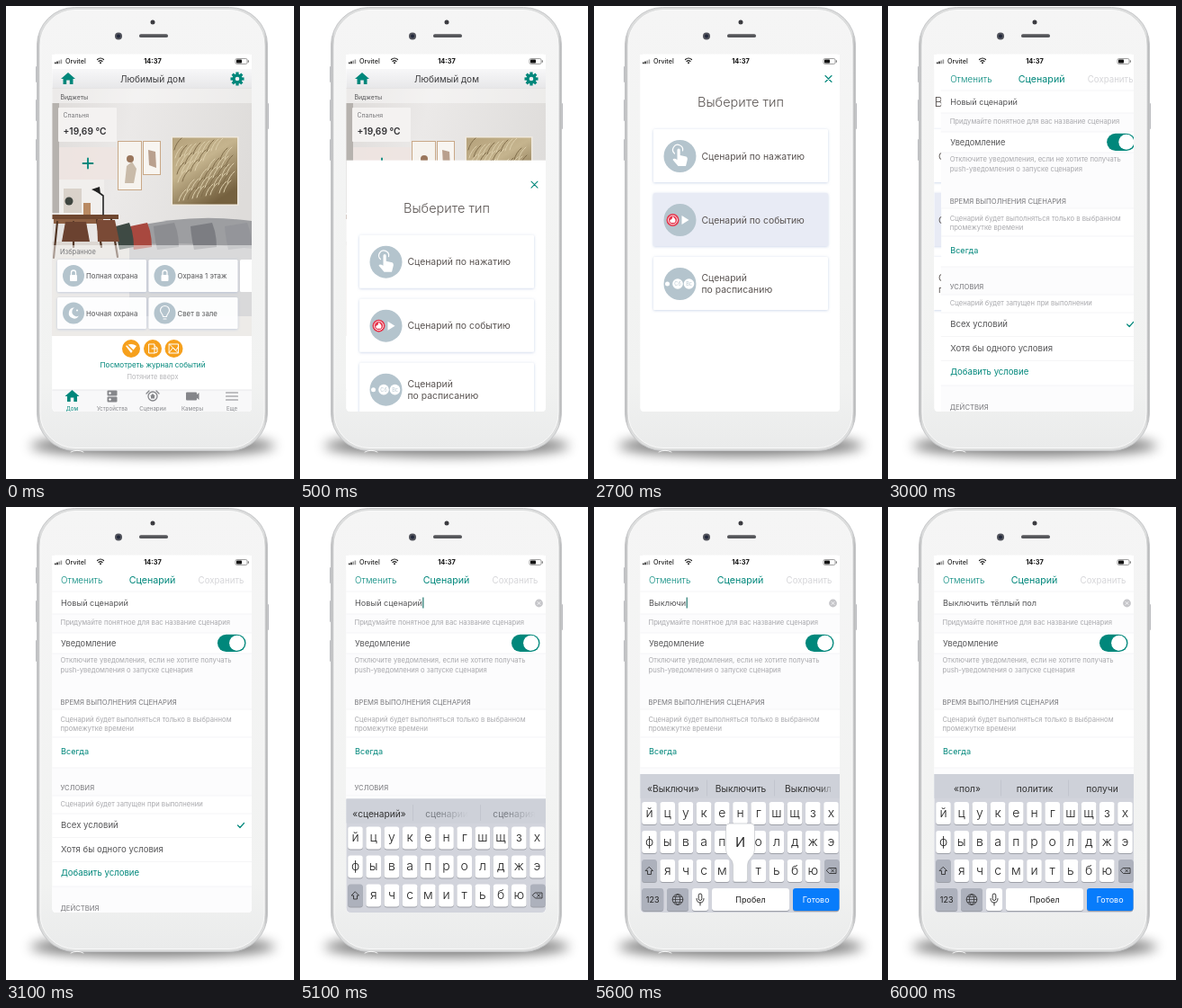
An HTML page that plays this animation: 320 px wide and 526 px high, repeating every 8000 ms.

```html
<!DOCTYPE html>
<html lang="ru">
<head>
<meta charset="utf-8">
<style>
html, body { margin: 0; width: 100%; height: 100%; overflow: hidden; background: #fff; }
svg { display: block; width: 100%; height: 100%; font-family: Inter, Roboto, sans-serif; }
</style>
</head>
<body>
<svg viewBox="0 0 320 526">
  <defs>
    <clipPath id="screen"><path d="M51.500 54H273V446q0 5-5 5H56.500q-5 0-5-5Z"/></clipPath>
    <clipPath id="photo"><rect x="51" y="91" width="222" height="276"/></clipPath>
    <filter id="blur" x="-20%" y="-150%" width="140%" height="400%"><feGaussianBlur stdDeviation="6.5"/></filter>
    <filter id="soft"><feGaussianBlur stdDeviation=".7"/></filter>
    <filter id="lift" x="-10%" y="-20%" width="120%" height="140%">
      <feDropShadow dx="0" dy="0.6" stdDeviation="1.6" flood-color="#8fa5cf" flood-opacity=".5"/>
    </filter>
    <linearGradient id="rim">
      <stop offset="0" stop-color="#b4b5b7"/><stop offset=".015" stop-color="#dcdddd"/>
      <stop offset=".985" stop-color="#dcdddd"/><stop offset="1" stop-color="#b0b1b3"/>
    </linearGradient>
    <linearGradient id="face" x2="0" y2="1">
      <stop offset="0" stop-color="#f5f5f5"/><stop offset=".85" stop-color="#f1f2f1"/><stop offset="1" stop-color="#eaebeb"/>
    </linearGradient>
    <linearGradient id="wall" x2="1" y2=".3">
      <stop offset="0" stop-color="#dedbd9"/><stop offset=".4" stop-color="#ebe9e8"/><stop offset="1" stop-color="#dedcda"/>
    </linearGradient>
    <linearGradient id="grass" x2=".6" y2="1">
      <stop offset="0" stop-color="#b5a27c"/><stop offset=".45" stop-color="#c5b48e"/><stop offset="1" stop-color="#75613f"/>
    </linearGradient>
    <linearGradient id="bar" x2="0" y2="1"><stop offset="0" stop-color="#f8f8f9"/><stop offset="1" stop-color="#e7e7e9"/></linearGradient>
    <linearGradient id="fade"><stop offset=".3" stop-color="#777b82"/><stop offset="1" stop-color="#777b82" stop-opacity="0"/></linearGradient>
    <linearGradient id="fadeEnd"><stop offset=".75" stop-color="#333"/><stop offset="1" stop-color="#333" stop-opacity=".15"/></linearGradient>
  </defs>
  <g id="body"></g>
  <g id="content" clip-path="url(#screen)"></g>
  <g id="status"></g>
</svg>
<script>
const TEAL = '#00877b', INK = '#555557', PALE = '#a9a9ad', DISC = '#b4c4cd';
const LIGHT = 'font-weight="300"';
const $ = id => document.getElementById(id);

const rect = (x, y, w, h, fill, r = 0, more = '') =>
  `<rect x="${x}" y="${y}" width="${w}" height="${h}" rx="${r}" fill="${fill}" ${more}/>`;
const disc = (x, y, r, fill, more = '') => `<circle cx="${x}" cy="${y}" r="${r}" fill="${fill}" ${more}/>`;
const fillPath = (d, fill) => `<path d="${d}" fill="${fill}"/>`;
const stroke = (d, color, width = 1) =>
  `<path d="${d}" fill="none" stroke="${color}" stroke-width="${width}" stroke-linecap="round" stroke-linejoin="round"/>`;
const text = (x, y, size, str, fill = INK, more = '') =>
  `<text x="${x}" y="${y}" font-size="${size}" fill="${fill}" ${more}>${str}</text>`;
const centred = (x, y, size, str, fill = INK, more = '') => text(x, y, size, str, fill, 'text-anchor="middle" ' + more);
const at = (x, y, inner) => `<g transform="translate(${x} ${y})">${inner}</g>`;

const house = color => fillPath('M0-7 8 0H5.5V6H1.8V1.5H-1.8V6H-5.5V0H-8Z', color);

function phone() {
  const side = (x, y, h) => rect(x, y, 2, h, '#bcbdc0', 1);
  return `<ellipse cx="163" cy="489" rx="136" ry="12" fill="#000" opacity=".5" filter="url(#blur)"/>` +
    side(33, 67, 18) + side(33, 104, 24) + side(33, 148, 24) + side(290, 108, 29) +
    rect(34.5, 1.5, 256, 493, 'url(#rim)', 42, 'stroke="#c6c7c9"') +
    rect(38, 4.5, 249, 487, 'url(#face)', 39, 'stroke="#f9f9f9"') +
    disc(163, 18, 2.5, '#3b3b40') + disc(125, 33.5, 4, '#50525a') + disc(125, 33.5, 2, '#22283c') +
    rect(148, 31.3, 32, 3.8, '#55565a', 1.9) +
    stroke('M72 496Q79 492.500 86 496', '#fff', .8) + rect(51.5, 53.5, 221.5, 397.5, '#fff', 4);
}

function statusBar() {
  const bars = [0, 1, 2, 3].map(i => rect(54 + i * 2.2, 62.5 - i, 1.6, 1.8 + i, i < 2 ? '#222' : '#999', .3)).join('');
  return rect(51.5, 54, 221.5, 16, '#fff') + bars + text(66, 64, 7.2, 'Orvitel', '#222', 'font-weight="500"') +
    stroke('M101.500 59.500Q105 56.500 108.500 59.500M103 61.500Q105 59.700 107 61.500', '#222', 1.2) + disc(105, 63.3, 1, '#222') +
    centred(163, 64, 7.4, '14:37', '#111', 'font-weight="700"') +
    rect(255, 58.5, 13, 6, 'none', 1.5, 'stroke="#777" stroke-width=".7"') + rect(256, 59.5, 6, 4, '#111', .7) +
    rect(268.7, 60.2, 1.2, 2.6, '#777', .5);
}

function room() {
  const blades = Array.from({ length: 60 }, (_, i) => {
    const x = 187 + i * 37 % 60, y = 153 + i * 23 % 58;
    return stroke(`M${x} ${y + 7}q2-8 8-13`, i % 3 ? '#ddcfac' : '#806d4b', 1);
  }).join('');
  const cushion = (x, w, color) => fillPath(`M${x} 245l${w - 3}-4q5 12 5 27l-${w - 2} 3q-3-13-${4}-26z`, color);
  return `<g clip-path="url(#photo)">` + rect(51, 91, 222, 276, 'url(#wall)') + '<g filter="url(#soft)">' +
    rect(51, 108, 8, 122, '#b6b2ae') + rect(59, 193, 50, 42, '#f1efed') +
    rect(64, 203, 20, 27, '#d9d2ca') + disc(70, 217, 4.5, '#3f4640') + rect(86, 219, 8, 14, '#b98a63') +
    rect(124.5, 150.5, 26, 54, '#f6f3ee', 0, 'stroke="#c9a887"') +
    fillPath('M132 197l2-19 6-5 5 8-3 16z', '#c9bba9') + disc(138, 170, 4, '#9a765c') +
    rect(152.5, 150.5, 19, 37, '#f8f5f1', 0, 'stroke="#c9a887"') + fillPath('M158 160l8 2 1 18-8-3z', '#b9a08e') +
    rect(183.5, 145, 75, 77, '#efe9df') + rect(185, 146.5, 72, 74, 'url(#grass)') + blades +
    rect(51, 262, 222, 105, '#dcd7d2') +
    fillPath('M142 246Q205 230 273 239V310H142Z', '#9d9ea1') + fillPath('M137 267Q185 260 273 270V345H137Z', '#b3b3b5') +
    cushion(164, 26, '#8c8d91') + cushion(205, 27, '#7c7d82') + cushion(243, 28, '#94959a') +
    cushion(138, 22, '#a8483f') + cushion(122, 18, '#3e4a44') +
    rect(51, 232, 74, 5, '#6f4730') + rect(53, 237, 55, 5, '#8d6043') +
    stroke('M57 240l-4 40M117 237l7 42M75 240v28M101 238l5 30', '#523625', 2.2) +
    fillPath('M66 240h23l4 22H62z', '#6b4230') + fillPath('M101 238h20l5 24h-24z', '#7a4a36') +
    stroke('M108 232V211l-8-6', '#222', 1.6) + fillPath('M95 204l9-3 1 8z', '#222') +
    '</g>' + rect(51, 266, 222, 101, '#fff', 0, 'opacity=".5"') + '</g>';
}

function home() {
  const lock = rect(-4, -1, 8, 7, '#fff', 1) + stroke('M-2.500-1V-3.500a2.500 2.500 0 0 1 5 0V-1', '#fff', 1.3);
  const moon = fillPath('M1-6A6 6 0 1 0 6 3 5 5 0 0 1 1-6Z', '#fff') + disc(4, -3, 1, '#fff');
  const bulb = stroke('M-2 4C-2 1-5 0-5-3a5 5 0 0 1 10 0C5 0 2 1 2 4ZM-1.500 6.500h3', '#fff', 1.1);
  const tile = (x, y, h, label, icon) => rect(x, y, 99, h, '#fff', 1.5, 'fill-opacity=".96" filter="url(#lift)"') +
    disc(x + 18, y + h / 2, 12, DISC) + at(x + 18, y + h / 2, icon) + text(x + 32, y + h / 2 + 3, 7.8, label);
  const alert = (x, icon) => disc(x, 381, 10, '#f6a01c') + at(x, 381, icon);
  const gray = '#85868a';
  const tab = (x, label, icon, color = gray) => at(x, 434, icon) + centred(x, 449.5, 6.1, label, color);
  const gear = Array.from({ length: 8 }, (_, i) => `<rect x="-1.600" y="-7.500" width="3.200" height="4" fill="${TEAL}" transform="rotate(${i * 45})"/>`).join('') +
    disc(0, 0, 3.9, 'none', `stroke="${TEAL}" stroke-width="3.200"`);

  return rect(51, 54, 222, 397, '#fff') + room() + rect(51, 69, 222, 22.5, 'url(#bar)') +
    at(69, 81, house(TEAL)) + centred(163, 84.5, 10.1, 'Любимый дом', '#3e3e40') + at(257, 81, gear) +
    rect(51, 92, 222, 16, '#fff', 0, 'opacity=".4"') + text(60.5, 103.5, 6.9, 'Виджеты') +
    rect(58, 113, 65, 38, '#f6f4f3', 1, 'opacity=".93"') + text(63.5, 124, 6.9, 'Спальня', '#77777a') +
    text(63.5, 143, 10.2, '+19,69 °C', '#303033', 'font-weight="600"') +
    rect(59, 157, 64, 36, '#f0e5e2', 1, 'opacity=".88"') + stroke('M85.500 175h11M91 169.500v11', TEAL, 1.8) +
    text(60, 276, 7.4, 'Избранное', '#77777a') +
    tile(57, 282, 36, 'Полная охрана', lock) + tile(158.5, 282, 36, 'Охрана 1 этаж', lock) +
    tile(57, 324, 35, 'Ночная охрана', moon) + tile(158.5, 324, 35, 'Свет в зале', bulb) +
    rect(260, 282, 20, 36, '#fff', 1.5) + rect(51, 367, 222, 60, '#fff') +
    alert(139, fillPath('M-6-3Q0-7 6-3L0 5Z', '#fff') + stroke('M-5-5 5 5', '#f6a01c', 1.5)) +
    alert(163, stroke('M-4-5H2V5H-4ZM2-3l3 2v5L2 5M-1 0h6', '#fff')) +
    alert(186.5, stroke('M-5-5H5V5H-5ZM-5 4l4-5 3 3 3-4M-5-5 5 5', '#fff')) +
    centred(163, 402, 8.1, 'Посмотреть журнал событий', TEAL) + centred(163, 415, 7.4, 'Потяните вверх', '#b5b5b8') +
    rect(51, 427, 222, 24, '#f8f8f9') + stroke('M51 427H273', '#d2d2d4', .5) +
    tab(73.5, 'Дом', house(TEAL), TEAL) +
    tab(118, 'Устройства', rect(-5.5, -6.5, 11, 6, gray, 1) + rect(-5.5, .5, 11, 6, gray, 1) + disc(-2.5, -3.5, 1.2, '#fff') + disc(-2.5, 3.5, 1.2, '#fff')) +
    tab(163, 'Сценарии', disc(0, 0, 5, 'none', `stroke="${gray}" stroke-width="1.300"`) + stroke('M-7-3l3-3M7-3l-3-3', gray, 1.3) + fillPath('M0-3 3 0H2V2.500H-2V0H-3Z', gray)) +
    tab(207, 'Камеры', rect(-7, -4.5, 12, 9, gray, 1) + fillPath('M4-1 7.500-4V4L4 1Z', gray)) +
    tab(251, 'Еще', stroke('M-6.500-4h13M-6.500 0h13M-6.500 4h13', gray, 1.2));
}

function chooser(pressed) {
  const hand = stroke('M-6-3a5.500 5.500 0 1 1 9-3', '#fff', 1.2) +
    fillPath('M-3-7a1.600 1.600 0 0 1 3.200 0V-1L7 0.500Q9 1.500 8 5L6.500 11H-2L-8 4Q-7 1.500-3 4Z', '#fff');
  const event = disc(-8, 0, 7, '#e5354c') + disc(-8, 0, 5, 'none', 'stroke="#fff" stroke-width=".9"') +
    fillPath('M-8-4Q-3 0-6 3H-10Q-13 0-9-1Z', '#fff') + fillPath('M2-5 10 0 2 5Z', '#fff');
  const days = disc(-14, 0, 2.5, '#fff') + disc(-2.5, 0, 5.8, '#fff') + disc(10, 0, 5.8, '#fff') +
    centred(-2.5, 2, 5.5, 'Сб', DISC) + centred(10, 2, 5.5, 'Вс', DISC);
  const card = (y, icon, lines, active) => rect(66, y, 194, 59, active ? '#e8ebf5' : '#fff', 1.5, 'filter="url(#lift)"') +
    disc(95.5, y + 30, 18, DISC) + at(95.5, y + 30, icon) +
    lines.map((line, i) => text(119.5, y + 33.5 + (i - (lines.length - 1) / 2) * 13, 10.4, line, '#5b5553')).join('');
  return rect(51, 54, 222, 397, '#fff') + stroke('M257 77.500l7 7M264 77.500l-7 7', TEAL, 1.1) +
    centred(163, 112, 14.5, 'Выберите тип', '#5b5553', LIGHT) +
    card(137, hand, ['Сценарий по нажатию']) + card(208, event, ['Сценарий по событию'], pressed) +
    card(279, days, ['Сценарий', 'по расписанию']);
}

function form(name, editing, cursor) {
  const rule = y => stroke(`M51 ${y}H273`, '#eaeaed', .5);
  const note = (y, str) => text(60.5, y, 7.65, str, PALE);
  const row = (y, str, color, size = 9.6) => text(61, y, size, str, color);
  const head = (y, str) => text(60.5, y, 7.7, str, '#77777b');
  const bands = [[119, 21], [163, 62], [290, 31], [422, 29]].map(([y, h]) => rect(51, y, 222, h, '#fcfcfd')).join('');
  return rect(51, 54, 222, 397, '#fff') + bands + [94, 119, 140, 163, 225, 256, 290, 321, 341, 367.5, 394.5, 422].map(rule).join('') +
    text(61, 84.5, 9.8, 'Отменить', TEAL, LIGHT) + centred(162.5, 84.5, 10.7, 'Сценарий', TEAL) +
    text(264.5, 84.5, 9.7, 'Сохранить', '#d6d6d9', 'text-anchor="end"') +
    text(61, 110, 9.15, name, INK, 'id="name"') +
    (cursor ? rect(61, 100.5, 1.1, 12, '#0d6b62', 0, 'id="cursor"') : '') +
    (editing ? disc(265.5, 107, 4.4, '#c5c5c9') + stroke('M264 105.500l3 3M267 105.500l-3 3', '#fff', .8) : '') +
    note(130.5, 'Придумайте понятное для вас название сценария') + row(155, 'Уведомление', INK, 9.25) +
    rect(235, 141.7, 31.5, 19.3, TEAL, 9.65) + disc(256.6, 151.35, 8.5, '#fff') +
    note(173, 'Отключите уведомления, если не хотите получать') + note(183.5, 'push-уведомления о запуске сценария') +
    head(219.5, 'ВРЕМЯ ВЫПОЛНЕНИЯ СЦЕНАРИЯ') +
    note(239, 'Сценарий будет выполняться только в выбранном') + note(249, 'промежутке времени') + row(274.5, 'Всегда', TEAL, 9.15) +
    head(314.5, 'УСЛОВИЯ') + note(333, 'Сценарий будет запущен при выполнении') +
    row(357.3, 'Всех условий') + stroke('M257.500 354l2.500 2.500 4.500-5', TEAL, 1.2) +
    row(383.8, 'Хотя бы одного условия') + row(410.3, 'Добавить условие', TEAL) + head(448.5, 'ДЕЙСТВИЯ');
}

const KEY_ROWS = ['йцукенгшщзх', 'фывапролджэ', ' ячсмитьбю'];
const keyX = col => 61.5 + col * 20.2, keyY = line => 328 + line * 32;

function keyboard(offset, words, held, faded) {
  const cap = (x, y, w, fill = '#fff') => rect(x, y + 1, w, 25, '#9da0a8', 3) + rect(x, y, w, 25, fill, 3);
  const dark = '#adb1bc';
  let out = rect(51, 297, 222, 190, '#d2d4dc') + rect(51, 297, 222, 27, '#ced1d9') +
    stroke('M125.500 304v17M200.500 304v17', '#bbbec6', .6);
  words.forEach((word, i) => {
    const fill = i === 0 ? '#333' : faded ? 'url(#fade)' : i === 2 && words[0] === '«Выключи»' ? 'url(#fadeEnd)' : '#333';
    out += centred(88 + i * 75, 317, 10.2, word, fill);
  });
  let bubble = '';
  KEY_ROWS.forEach((letters, line) => [...letters].forEach((letter, col) => {
    if (letter === ' ') return;
    const x = keyX(col), y = keyY(line);
    out += cap(x - 8.3, y, 16.6) + centred(x, y + 16.7, 14, letter, '#222', LIGHT);
    if (letter === held) {
      bubble = `<path d="M${x - 12} ${y - 40}h24q4 0 4 4v25q0 5-4 9t-4 8v16q0 3-3 3h-10q-3 0-3-3v-16q0-4-4-8t-4-9v-25q0-4 4-4z" fill="#fff" stroke="#b7bac0" stroke-width=".6"/>` +
        centred(x, y - 14, 20, letter, '#222', LIGHT);
    }
  }));
  out += cap(53.2, 392, 16.6, dark) + stroke('M61.500 400.500l4 4h-2v4h-4v-4h-2z', '#222', .8) +
    cap(256, 392, 16.6, dark) + stroke('M261.500 401.500h7.500v6H261.500l-3-3zM263.700 403l3 3M266.700 403l-3 3', '#222', .8) +
    cap(53.2, 424, 24, dark) + centred(65.2, 440, 9, '123', '#222') +
    cap(81, 424, 24, dark) + disc(93, 436.5, 5.8, 'none', 'stroke="#222" stroke-width=".8"') +
    `<ellipse cx="93" cy="436.500" rx="2.600" ry="5.800" fill="none" stroke="#222" stroke-width=".7"/>` +
    stroke('M87.500 436.500h11M88.500 433.500h9M88.500 439.500h9', '#222', .6) +
    cap(109, 424, 18) + rect(116.2, 430, 3.6, 7.5, 'none', 1.8, 'stroke="#222" stroke-width=".9"') +
    stroke('M114 435.500q0 4.500 4 4.500t4-4.500M118 440v3', '#222', .9) +
    cap(131, 424, 86) + centred(174, 439.5, 9, 'Пробел', '#222') +
    cap(221, 424, 51.5, '#087cfb') + centred(246.7, 439.5, 9, 'Готово', '#fff');
  return at(0, offset, out + bubble);
}

const OLD_NAME = 'Новый сценарий', NEW_NAME = 'Выключить тёплый пол';
// Letters typed at each 100 ms step from 5200 to 6000.
const TYPED = [0, 1, 3, 5, 7, 9, 12, 16, 20];

function suggestions(name) {
  if (!name || name === OLD_NAME) return ['«сценарий»', 'сценарии', 'сценария'];
  const word = name.split(' ').pop();
  if (word === 'пол') return ['«пол»', 'политик', 'получи'];
  return name.length < 10 ? [`«${word}»`, 'Выключить', 'Выключил'] : [`«${word}»`, 'тёплый', 'тёплые'];
}

const easeOut = p => 1 - (1 - Math.min(1, Math.max(0, p))) ** 3;

function scene(t) {
  if (t < 2900) {
    const rise = easeOut((t - 400) / 300);
    return (rise < 1 ? home() : '') + (rise > 0 ? at(0, 397 * (1 - rise), chooser(t >= 2700)) : '');
  }
  const push = easeOut((t - 2800) / 300);
  const editing = t >= 5100, done = t >= 6000;
  const count = TYPED[Math.min(8, (t - 5200) / 100)];
  const name = t < 5200 ? OLD_NAME : NEW_NAME.slice(0, count);
  let out = (push < 1 ? at(-66 * push, 0, chooser(true)) : '') +
    at(221 * (1 - push), 0, form(name, editing, editing && !done));
  if (editing) {
    const held = t >= 5200 && !done ? name.slice(-1).toLowerCase() : '';
    out += keyboard(t < 5200 ? 27.5 : 0, suggestions(name), held, t < 5200);
  }
  return out;
}

$('body').innerHTML = phone();
$('status').innerHTML = statusBar();

let shown = -1;
function draw(now) {
  const t = Math.floor(now % 8000 / 100) * 100;
  // The home screen must still be on show when 500 begins the slide.
  if (t !== shown) {
    shown = t;
    $('content').innerHTML = scene(t);
    const cursor = $('cursor');
    if (cursor) cursor.setAttribute('x', 61.5 + $('name').getComputedTextLength());
  }
  requestAnimationFrame(draw);
}
draw(performance.now());
</script>
</body>
</html>
```
